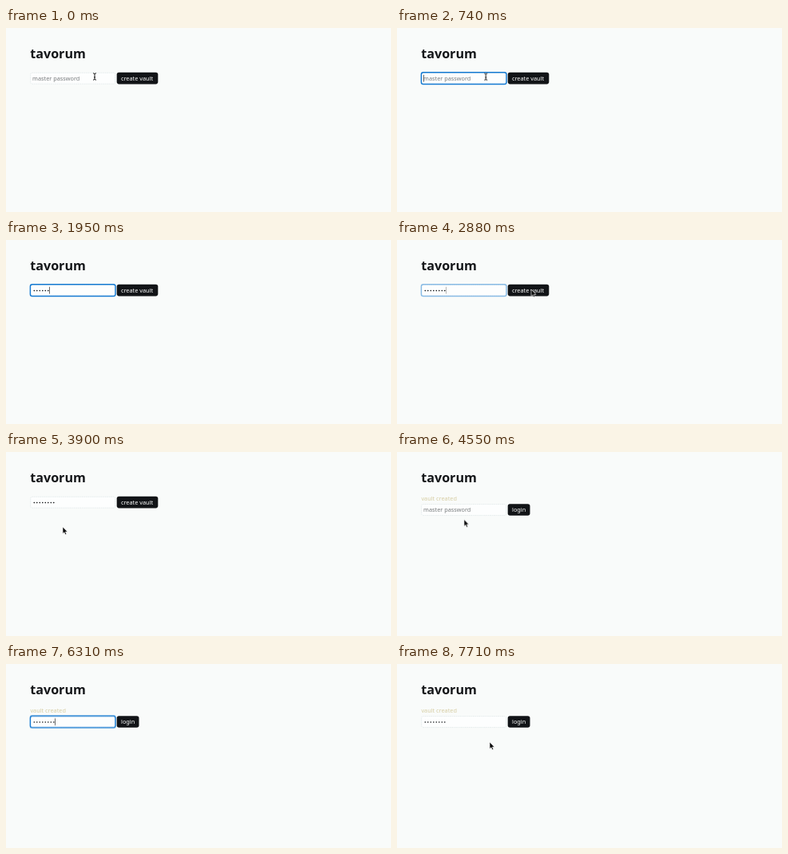
Write an HTML page that moves like this. It is 482x231 px and loops after 8000 ms.

```html
<!DOCTYPE html>
<html lang="en">
<head>
<meta charset="utf-8">
<title>tavorum</title>
<style>
html, body { margin: 0; width: 100%; height: 100%; overflow: hidden; background: #f9fbfa; }
svg { display: block; width: 482px; height: 231px; font: 7.3px "Noto Sans", "Open Sans", sans-serif; }
svg * { animation-duration: 8s; animation-iteration-count: infinite; animation-timing-function: linear; }

.title { font-size: 16.15px; font-weight: 700; fill: #141619; }
.field { fill: #fdfefe; stroke: #dfe8e9; stroke-width: .8; stroke-dasharray: 1.6 .8; }
.cover { fill: #fdfefe; }
.dots { stroke: #151719; stroke-width: 1.65; stroke-linecap: round; stroke-dasharray: 0 3.5; }
.hint { fill: #777a7c; }
.ring { fill: none; stroke: #157ad2; stroke-width: 1.45; }
.caret { fill: #444; }
.button { fill: #121417; }
.label { font-weight: 500; fill: #fff; }
.notice { fill: #d6cda3; }
.tip rect { fill: #4c504d; stroke: #6c706d; stroke-width: .6; }
.tip text { font: 6.4px Inter, "Liberation Sans", sans-serif; fill: #eceeec; }

.step { animation-timing-function: step-end; }
.create { animation-name: create; }
.login { animation-name: login; }
.create .hint { animation-name: hint-a; }
.login .hint { animation-name: hint-b; }
.create .focus { animation-name: focus-a; }
.login .focus { animation-name: focus-b; }
.create .typed { animation-name: type-a; }
.login .typed { animation-name: type-b; }
.notice { animation-name: notice; }
.tip { animation-name: tip; }
.pointer { animation-name: travel; }
.beam { animation-name: beam; }
.arrow { animation-name: arrow; }

@keyframes create { 0% { visibility: visible } 51.125%, 100% { visibility: hidden } }
@keyframes login { 0% { visibility: hidden } 51.125%, 100% { visibility: visible } }
@keyframes notice { 0%, 50.5% { opacity: 0 } 53.375%, 100% { opacity: 1 } }
@keyframes hint-a { 0% { opacity: 1 } 17.375%, 100% { opacity: 0 } }
@keyframes hint-b { 0% { opacity: 1 } 68.5%, 100% { opacity: 0 } }
@keyframes focus-a {
  0%, 3.4% { opacity: 0 } 4.6%, 34.8% { opacity: 1 } 37.1%, 100% { opacity: 0 }
}
@keyframes focus-b {
  0%, 59.2% { opacity: 0 } 60.4%, 88.1% { opacity: 1 } 90.5%, 100% { opacity: 0 }
}
@keyframes type-a {
  0% { transform: none }
  17.375% { transform: translateX(3.5px) }
  18.625% { transform: translateX(7px) }
  20.875% { transform: translateX(10.5px) }
  22% { transform: translateX(14px) }
  23.25% { transform: translateX(17.5px) }
  24.375% { transform: translateX(21px) }
  25.5% { transform: translateX(24.5px) }
  26.75%, 100% { transform: translateX(28px) }
}
@keyframes type-b {
  0% { transform: none }
  68.5% { transform: translateX(3.5px) }
  70.75% { transform: translateX(7px) }
  71.9% { transform: translateX(10.5px) }
  73.1% { transform: translateX(14px) }
  74.25% { transform: translateX(17.5px) }
  75.4% { transform: translateX(21px) }
  76.6% { transform: translateX(24.5px) }
  77.75%, 100% { transform: translateX(28px) }
}
@keyframes tip {
  0%, 11.6% { opacity: 0 } 13.9%, 17.3% { opacity: 1 } 17.375%, 100% { opacity: 0 }
}
@keyframes travel {
  0%, 8.125% { transform: translate(111px, 61px) }
  13.875%, 29% { transform: translate(112px, 62px) }
  34.75%, 42.4% { transform: translate(168px, 62px) }
  46.5% { transform: translate(80px, 101px) }
  48.75%, 55% { transform: translate(71px, 94px) }
  59.25%, 60.4% { transform: translate(100px, 73px) }
  63.875%, 82% { transform: translate(102px, 148px) }
  88.1%, 94% { transform: translate(155px, 73px) }
  96.375%, 100% { transform: translate(116px, 98px) }
}
@keyframes beam {
  0% { opacity: 1 } 17.375% { opacity: 0 }
  29% { opacity: 1 } 31.5% { opacity: 0 }
  58% { opacity: 1 } 60.9%, 100% { opacity: 0 }
}
@keyframes arrow {
  0% { opacity: 0 } 31.5% { opacity: 1 }
  58% { opacity: 0 } 60.9% { opacity: 1 }
  68.5% { opacity: 0 } 82.375%, 100% { opacity: 1 }
}
</style>
</head>
<body>
<svg viewBox="0 0 482 231">
  <text class="title" x="30.2" y="38">tavorum</text>

  <g class="create step">
    <rect class="field" x="30.7" y="56.2" width="106" height="14" rx="2"/>
    <path class="dots" d="M35.3 63.6h25.5"/>
    <g class="typed step"><rect class="cover" x="33.4" y="60" width="30" height="7"/></g>
    <text class="hint step" x="33.1" y="65.8">master password</text>
    <g class="focus">
      <rect class="ring" x="30.4" y="55.8" width="106.6" height="14.7" rx="2.6"/>
      <g class="typed step"><rect class="caret" x="33.2" y="58.8" width=".8" height="8.8"/></g>
    </g>
    <rect class="button" x="138.7" y="55.8" width="51.6" height="14.6" rx="2.8"/>
    <text class="label" x="144" y="65.8">create vault</text>
  </g>

  <g class="login step">
    <text class="notice" x="30.4" y="61.3">vault created</text>
    <g transform="translate(0 9.4)">
      <rect class="field" x="30.7" y="56.2" width="106" height="14" rx="2"/>
      <path class="dots" d="M35.3 63.6h25.5"/>
      <g class="typed step"><rect class="cover" x="33.4" y="60" width="30" height="7"/></g>
      <text class="hint step" x="33.1" y="65.8">master password</text>
      <g class="focus">
        <rect class="ring" x="30.4" y="55.8" width="106.6" height="14.7" rx="2.6"/>
        <g class="typed step"><rect class="caret" x="33.2" y="58.8" width=".8" height="8.8"/></g>
      </g>
      <rect class="button" x="138.7" y="55.8" width="27.8" height="14.6" rx="2.8"/>
      <text class="label" x="144" y="65.8">login</text>
    </g>
  </g>

  <g class="tip">
    <rect x="111.6" y="73.4" width="74.8" height="10.2"/>
    <text x="114.4" y="80.8">Please fill out this field.</text>
  </g>

  <g class="pointer">
    <path class="beam step" d="M-2-4.2Q0-4.2 0-3Q0-4.2 2-4.2M0-3V3M-2 4.2Q0 4.2 0 3Q0 4.2 2 4.2M-1 .9H1"
      fill="none" stroke="#1c1c1c" stroke-width="1"/>
    <path class="arrow step" d="M0 0V8.6L1.9 6.8L3.2 9.8L4.7 9.1L3.4 6.3H6Z"
      fill="#0c0c0c" stroke="#fff" stroke-width=".6"/>
  </g>
</svg>
</body>
</html>
```
